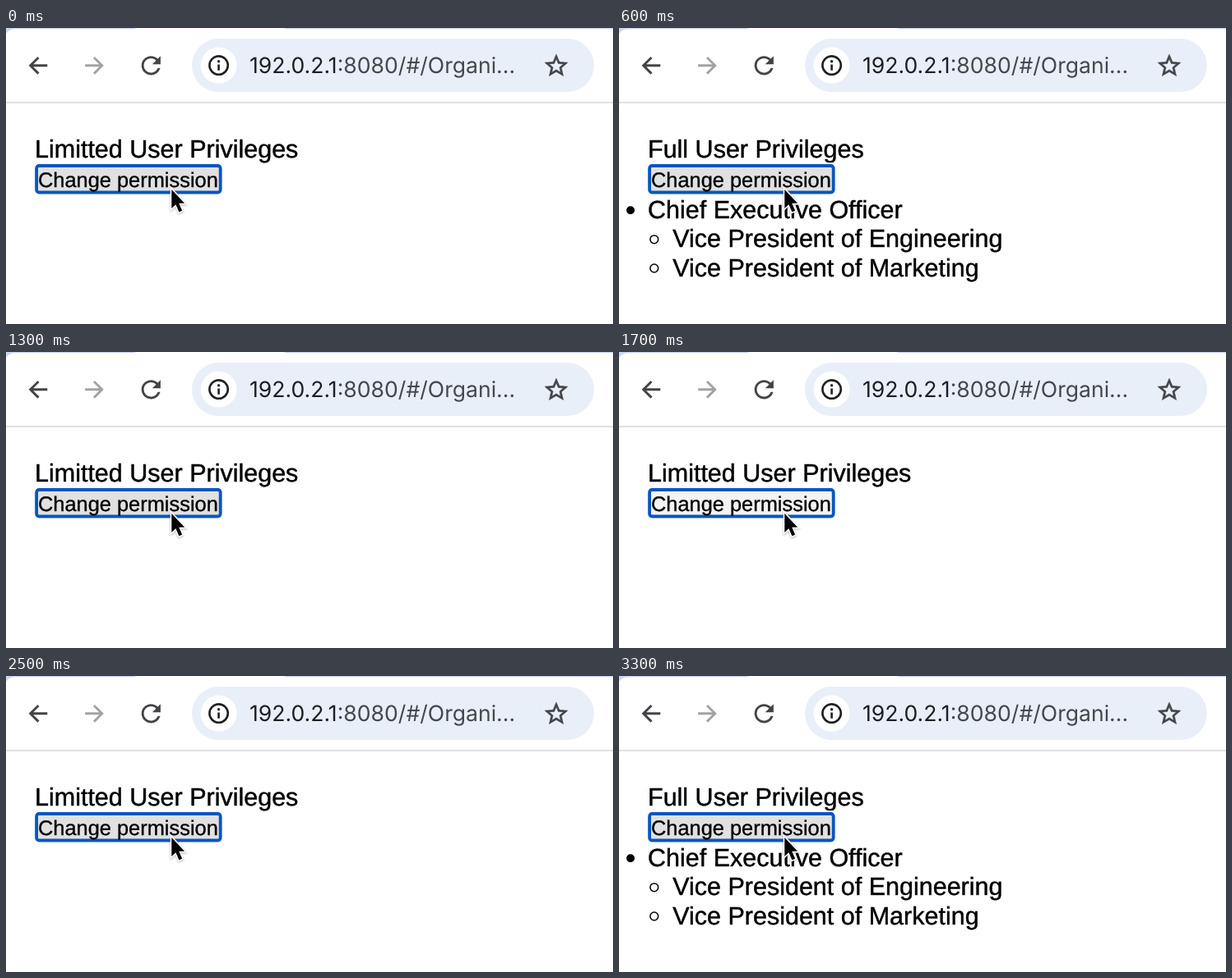
These frames come from a looping animation (738x361 px, 3.8 s). An HTML page:

```html
<!DOCTYPE html>
<html lang="en">
<head>
<meta charset="utf-8">
<title>Change permission</title>
<style>
  html, body { margin: 0; width: 100%; height: 100%; overflow: hidden; background: #fff; }
  svg { display: block; width: 738px; height: 361px; }
  text { text-rendering: geometricPrecision; }
  .page { font: 30.5px "Liberation Sans", Arial, sans-serif; fill: #000; }
  .page text { stroke: #000; stroke-width: .45; }
  .page .label { font-size: 25.4px; stroke-width: .35; }
  .url { font: 26.6px Inter, Roboto, sans-serif; fill: #1f2024; }
  .dim { fill: #45484d; }
  .icon { fill: none; stroke: #434447; stroke-width: 2.9; }
</style>
</head>
<body>
<svg viewBox="0 0 738 361" xmlns="http://www.w3.org/2000/svg">
  <rect width="738" height="361" fill="#fff"/>

  <!-- Tab strip and toolbar -->
  <path d="M0 0H158Q157 1.3 154 1.3H10Q3 2 0 7Z" fill="#c8d6f0"/>
  <path d="M338 0H738V1.3H343Q339 1.3 338 0Z" fill="#c8d6f0"/>
  <rect y="90" width="738" height="1.7" fill="#dadce0"/>
  <path class="icon" d="M50.3 45.8H30M39.5 36L29.7 45.8L39.5 55.6"/>
  <path class="icon" d="M96.2 45.8H116.5M107 36L116.8 45.8L107 55.6" style="stroke:#a2a3a5"/>
  <path transform="translate(158.9 28.4) scale(1.45)" fill="#434447" d="M17.65 6.35C16.2 4.9 14.21 4 12 4c-4.42 0-7.99 3.58-7.99 8s3.57 8 7.99 8c3.73 0 6.84-2.55 7.73-6h-2.08c-.82 2.33-3.04 4-5.65 4-3.31 0-6-2.69-6-6s2.69-6 6-6c1.66 0 3.14.69 4.22 1.78L13 11h7V4l-2.35 2.35z"/>
  <rect x="226" y="13" width="489" height="65" rx="32.5" fill="#e9eff8"/>
  <circle cx="258.6" cy="45.6" r="22" fill="#fff"/>
  <g fill="none" stroke="#1f2024" stroke-width="2.6">
    <circle cx="258.6" cy="45.6" r="11.2"/>
    <path d="M258.6 44.5V51.7"/>
  </g>
  <circle cx="258.6" cy="40.8" r="1.7" fill="#1f2024"/>
  <text class="url" x="296" y="55.2">192.0.2.1<tspan class="dim">:8080/#/Organi...</tspan></text>
  <path transform="translate(652.2 29.2) scale(1.4)" fill="#434447" stroke="#434447" stroke-width=".35" d="M22 9.24l-7.19-.62L12 2 9.19 8.63 2 9.24l5.46 4.73L5.82 21 12 17.27 18.18 21l-1.63-7.03L22 9.24zM12 15.4l-3.76 2.27 1-4.28-3.32-2.88 4.38-.38L12 6.1l1.71 4.04 4.38.38-3.32 2.88 1 4.28L12 15.4z"/>

  <!-- Page -->
  <g class="page">
    <text id="heading" x="35" y="158.3"></text>
    <rect x="33.6" y="164.3" width="230.6" height="39.8" rx="6" fill="#fff"/>
    <rect id="button" x="37.1" y="168" width="223.6" height="32.5" rx="3.2" stroke="#0a55bf" stroke-width="3.8"/>
    <text class="label" x="39" y="193.9">Change permission</text>
    <g id="list">
      <circle cx="14" cy="222.3" r="5"/>
      <text x="35" y="231.8">Chief Executive Officer</text>
      <g fill="none" stroke="#000" stroke-width="1.5">
        <circle cx="42.8" cy="257.8" r="4.9"/>
        <circle cx="42.8" cy="293" r="4.9"/>
      </g>
      <text x="65.2" y="267.3">Vice President of Engineering</text>
      <text x="65.2" y="302.8">Vice President of Marketing</text>
    </g>
  </g>

  <!-- Pointer -->
  <path d="M201.3 197V220L206.4 215.2L210.4 224.5L214.2 222.8L210.2 213.7H217.2Z" fill="#000" stroke="#fff" stroke-width="3.2" paint-order="stroke" style="filter:drop-shadow(0 1px 1px rgba(0,0,0,.3))"/>
</svg>
<script>
  const LOOP = 3800;
  const HOLD = 200;
  const presses = [400, 1000, 1700, 2300, 3000];
  const [heading, button, list] = ["heading", "button", "list"].map(id => document.getElementById(id));

  function draw(t) {
    const pressed = presses.some(p => t >= p && t < p + HOLD);
    // Each release toggles the permission level.
    const full = presses.filter(p => t >= p + HOLD).length % 2 === 1;
    heading.textContent = full ? "Full User Privileges" : "Limitted User Privileges";
    list.style.display = full ? "" : "none";
    button.setAttribute("fill", pressed ? "#f3f3f3" : "#e1e1e1");
  }

  const start = performance.now();
  function tick() {
    draw((performance.now() - start) % LOOP);
    requestAnimationFrame(tick);
  }
  tick();
</script>
</body>
</html>
```
